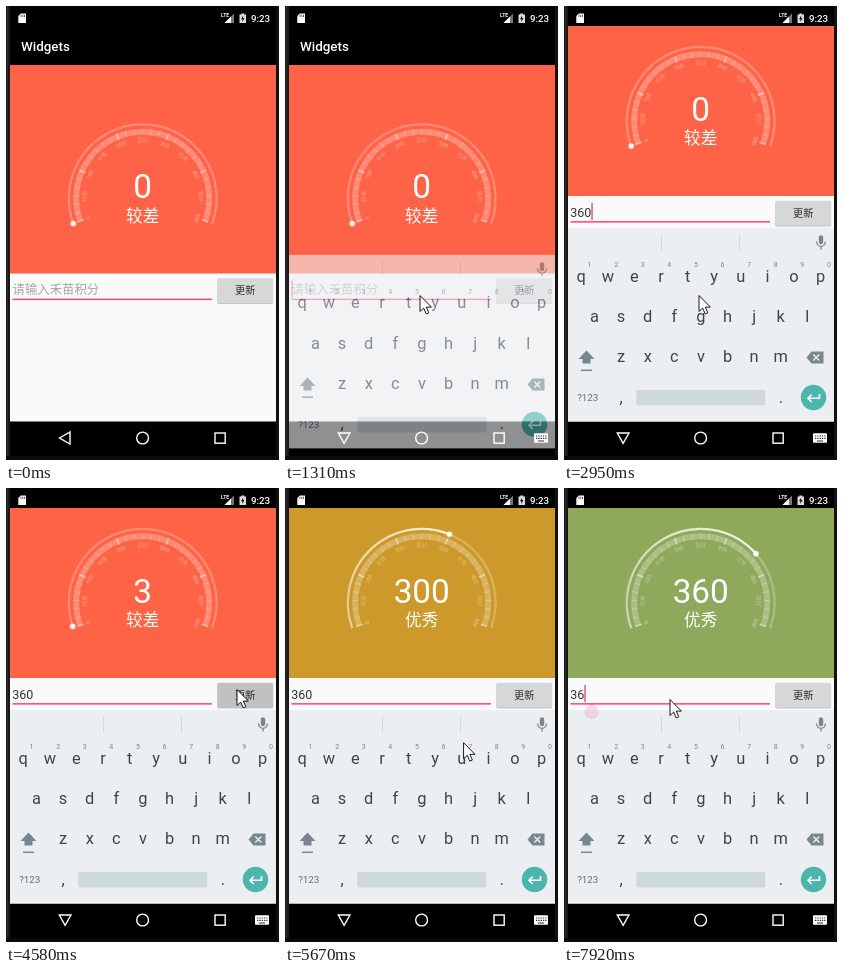
Recreate the animation shown at these times as an HTML page. Size 273 by 454 pixels, loop 8000 ms.

```html
<!DOCTYPE html>
<html lang="zh">
<head>
<meta charset="utf-8">
<title>Gauge</title>
<style>
html, body { margin: 0; width: 100%; height: 100%; overflow: hidden; background: #000; }
svg { display: block; width: 273px; height: 454px; }
text { font-family: Roboto, "Noto Sans CJK SC", "Noto Sans CJK", sans-serif; }
.mid { text-anchor: middle; }
.ui { fill: none; stroke: #fff; stroke-width: 1.4; }
</style>
</head>
<body>
<svg viewBox="0 0 273 454">
  <defs><linearGradient id="sweep" gradientUnits="userSpaceOnUse" x1="-74" x2="74"></linearGradient></defs>
  <rect width="273" height="454" fill="#0a0a0a"/>
  <rect x="4" y="20" width="266" height="430" fill="#fafafa"/>

  <g id="page">
    <rect x="4" y="15" width="266" height="44"/>
    <text x="15" y="45" font-size="13.4" font-weight="500" fill="#fff">Widgets</text>
    <rect id="panel" x="4" y="59" width="266" height="208.5"/>
    <g transform="translate(136.7 192.3)" fill="#fff">
      <g id="dial"></g>
      <path id="trail" fill="none" stroke="url(#sweep)" stroke-width="2.2"/>
      <g id="dot"><circle r="3.2" opacity=".4"/><circle r="2.4"/></g>
      <text id="score" class="mid" font-size="33.3"></text>
      <text id="grade" class="mid" y="23.7" font-size="16.6"></text>
    </g>
    <text id="hint" x="6.5" y="288" font-size="12.4" fill="#a6a6a6">请输入禾苗积分</text>
    <text id="entry" x="6.3" y="288" font-size="12.5" fill="#333"></text>
    <rect id="caret" y="274.5" width="1.3" height="17" fill="#e0407a"/>
    <rect x="6.5" y="292.6" width="199.5" height="1.5" fill="#ff4081"/>
    <rect x="211.3" y="273" width="55.8" height="25" rx="1.5" fill="#c4c4c4"/>
    <rect id="button" x="211.3" y="272.2" width="55.8" height="24.8" rx="1.5"/>
    <text class="mid" x="239.2" y="288" font-size="10.2" fill="#2b2b2b">更新</text>
  </g>

  <rect x="4" y="415.5" width="266" height="34.5"/>
  <g id="board"></g>
  <path id="handle" d="M27.7 214.8L33 219.3A7.2 7.2 0 1 1 22.4 219.3Z" fill="#ff4081"/>

  <path id="back" class="ui" d="M53.5 432L64 426V438Z"/>
  <path id="hide" class="ui" d="M53.3 427H65L59.1 437.3Z"/>
  <circle class="ui" cx="136.6" cy="432" r="5.9"/>
  <rect class="ui" x="209" y="427" width="10.2" height="10.2"/>
  <g id="picker">
    <rect x="249" y="427.2" width="14" height="9.6" rx="1" fill="#fff"/>
    <path d="M251 430H261.500M251 432.400H261.500" stroke="#333" stroke-width="1.1" stroke-dasharray="1.300 1"/>
    <path d="M253 435H259" stroke="#333"/>
  </g>

  <rect width="273" height="20"/>
  <path d="M14.800 7.500H20V17H12.300V10Z" fill="#fff"/>
  <path d="M15 8.700V11M16.800 8.700V11M18.500 8.700V11" stroke="#000" stroke-width=".6"/>
  <text x="215" y="11" font-size="5" font-weight="700" fill="#fff">LTE</text>
  <path d="M228 7.500V17H218.500Z" fill="#777"/>
  <path d="M225 10.500V17H218.500Z" fill="#fff"/>
  <path d="M235.300 7.500H238.200V8.500H240V17H233.500V8.500H235.300Z" fill="#ddd"/>
  <path d="M237.300 9.500L235 13.300H236.600L236.200 16L238.500 12.200H237Z"/>
  <text x="245" y="16" font-size="9.7" font-weight="500" fill="#fff">9:23</text>

  <rect width="4" height="454" fill="#191919"/>
  <rect x="1" width="1" height="454" fill="#2b2b2b"/>
  <rect x="270" width="3" height="454" fill="#111"/>
  <rect y="450" width="273" height="4" fill="#0a0a0a"/>
  <path id="mouse" d="M0 0V16L3.700 12.600L6.200 18.400L8.800 17.300L6.300 11.600H11.400Z" fill="#fff" stroke="#000" stroke-width=".9"/>
</svg>
<script>
const LOOP = 8000, MAX = 500, START = 160, SWEEP = 220, R = 66.5, RIM = 73.9;
const GRADES = ['较差', '中等', '良好', '优秀', '极好'];
const RED = [255, 99, 71], ORANGE = [255, 140, 0], CYAN = [0, 206, 209];
const $ = id => document.getElementById(id);
const mix = (a, b, p) => a + (b - a) * p;

// Each key is [time, value, value...]; values hold outside the range.
function track(keys, t) {
  if (t <= keys[0][0]) return keys[0].slice(1);
  for (let i = 1; i < keys.length; i++) {
    const [a, b] = [keys[i - 1], keys[i]];
    if (t < b[0]) return b.slice(1).map((v, k) => mix(a[k + 1], v, (t - a[0]) / (b[0] - a[0])));
  }
  return keys[keys.length - 1].slice(1);
}

function polar(r, deg) {
  const a = deg * Math.PI / 180;
  return [(r * Math.cos(a)).toFixed(2), (r * Math.sin(a)).toFixed(2)];
}

function arc(r, sweep) {
  return `M${polar(r, START)}A${r} ${r} 0 ${sweep > 180 ? 1 : 0} 1 ${polar(r, START + sweep)}`;
}

function buildDial() {
  let out = `<g fill="none" stroke="#fff" stroke-opacity=".25">
    <path d="${arc(R, SWEEP)}" stroke-width="5.9"/><path d="${arc(RIM, SWEEP)}" stroke-width="2.2"/></g>`;
  for (let i = 0; i <= 30; i++) {
    const major = i % 6 === 0, named = i % 6 === 3;
    const label = major ? i * MAX / 30 : named ? GRADES[(i - 3) / 6] : '';
    out += `<g transform="rotate(${START - 270 + SWEEP / 30 * i})" opacity="${major ? .5 : .34}">
      <path d="M0 ${-R - 3}V${-R + (major ? 3.7 : 3)}" stroke="#fff" stroke-width="${major ? 1.5 : .75}"/>
      <text class="mid" y="-56" font-size="5.6">${label}</text></g>`;
  }
  $('dial').innerHTML = out;

  let stops = '';
  for (let a = 180; a <= 360; a += 20) {
    const alpha = a <= 240 ? (a - 120) / 200 : .6 + (a - 240) / 300;
    stops += `<stop offset="${(1 + Math.cos(a * Math.PI / 180)) / 2}" stop-color="#fff" stop-opacity="${alpha}"/>`;
  }
  $('sweep').innerHTML = stops;
}

function buildBoard() {
  const ink = '#37474f', soft = '#78878e';
  const key = (s, x, y, size = 16.4, fill = ink) =>
    `<text class="mid" x="${x}" y="${y}" font-size="${size}" fill="${fill}">${s}</text>`;
  let out = `<rect x="4" y="222" width="266" height="193.5" fill="#eceff1"/>
    <path d="M97.500 228V244.500M175.500 228V244.500" stroke="#d3d9dc"/>
    <g fill="none" stroke="${soft}" stroke-width="1.3"><path d="M252.600 235.500a4.400 4.800 0 0 0 8.800 0M257 240.500V243.500"/>
    <path d="M257 231.500V236" stroke-width="4.400" stroke-linecap="round"/></g>`;
  [['qwertyuiop', 17.2], ['asdfghjkl', 30.5], ['zxcvbnm', 57.1]].forEach(([row, x], r) => {
    [...row].forEach((c, i) => {
      out += key(c, x + i * 26.6, 275.6 + r * 40.3);
      if (!r) out += key((i + 1) % 10, x + 8.3 + i * 26.6, 261, 7, soft);
    });
  });
  $('board').innerHTML = out + key('?123', 23.8, 395, 9.8, '#5f6f77') + key(',', 57, 396.5) + key('.', 216.8, 396.5) +
    `<path d="M22.500 344.500L30.500 353H26.500V357.500H18.500V353H14.500Z" fill="${soft}"/>
    <path d="M17 364.300H28" stroke="${soft}" stroke-width="1.500"/>
    <path d="M242.500 351.500L247.500 345.500H259.500V357.500H247.500Z" fill="${soft}"/>
    <path d="M249.300 348.500L255.300 354.500M255.300 348.500L249.300 354.500" stroke="#eceff1" stroke-width="1.400"/>
    <rect x="72.300" y="384" width="129" height="15.500" rx="2" fill="#cfd8dc"/>
    <circle cx="249.500" cy="391.500" r="12.700" fill="#4db6ac"/>
    <path d="M255.500 388V392.300H244M247.700 388.500L244 392.300L247.700 396" fill="none" stroke="#fff" stroke-width="1.600"/>`;
}

const MOUSE = [[150, 201, 456], [300, 186, 410], [500, 153, 335], [760, 135, 289.5], [3430, 135, 289.5],
  [3490, 137, 267], [3650, 150, 257], [3880, 196, 222], [4110, 231, 201.5], [4650, 231, 201.5],
  [5200, 182, 259], [5500, 182, 259], [5700, 178, 254], [6230, 178, 254],
  [6420, 129.5, 231.5], [6730, 108, 218], [6960, 106, 211.5]];
const BLINKS = [250, 760, 1080, 1540, 2240, 3410, 3950, 4480, 5030, 5570, 6120, 6650, 7140, 7690, 7840];

function panelColor(n) {
  const half = MAX / 2;
  const [a, b, p] = n <= half ? [RED, ORANGE, n / half] : [ORANGE, CYAN, n / half - 1];
  return `rgb(${a.map((v, i) => Math.round(mix(v, b[i], p)))})`;
}

function drawGauge(n) {
  const sweep = n / MAX * SWEEP;
  $('panel').setAttribute('fill', panelColor(n));
  $('trail').setAttribute('d', n ? arc(RIM, sweep) : '');
  $('dot').setAttribute('transform', `translate(${polar(RIM, START + sweep)})`);
  $('score').textContent = n;
  $('grade').textContent = GRADES[Math.min(4, Math.floor(n / MAX * 5))];
}

function draw(t) {
  const [p] = track([[4472, 0], [5430, .56], [6040, 1]], t);
  drawGauge(Math.floor(360 * (1 - Math.cos(Math.PI * p)) / 2));

  const [pan] = track([[1390, 0], [1460, 55], [1540, 77.5]], t);
  $('page').setAttribute('transform', `translate(0 ${-pan})`);
  const [rise] = track([[1080, 0], [1540, 1]], t);
  $('board').setAttribute('transform', `translate(0 ${54 * (1 - rise)})`);
  $('board').setAttribute('opacity', Math.min(1, rise * 1.2));

  const typing = t >= 1180;
  $('back').setAttribute('opacity', typing ? 0 : 1);
  $('hide').setAttribute('opacity', typing ? 1 : 0);
  $('picker').setAttribute('opacity', typing ? 1 : 0);

  const digits = t >= 7840 ? 2 : [2400, 2550, 2950].filter(k => t >= k).length;
  $('entry').textContent = '360'.slice(0, digits);
  $('hint').setAttribute('opacity', digits ? 0 : 1);
  $('caret').setAttribute('x', 6.4 + digits * 7);
  $('caret').setAttribute('opacity', BLINKS.filter(k => t >= k).length % 2);
  $('button').setAttribute('fill', t >= 4430 && t < 4900 ? '#c1c1c1' : '#d6d7d7');
  $('handle').setAttribute('opacity', t < 7380 ? 0 : track([[7780, 1], [7840, .5], [7920, .16]], t)[0]);
  $('mouse').setAttribute('transform', `translate(${track(MOUSE, t)})`);
}

buildDial();
buildBoard();
const origin = performance.now();
function tick() {
  draw((performance.now() - origin) % LOOP);
  requestAnimationFrame(tick);
}
tick();
</script>
</body>
</html>
```
